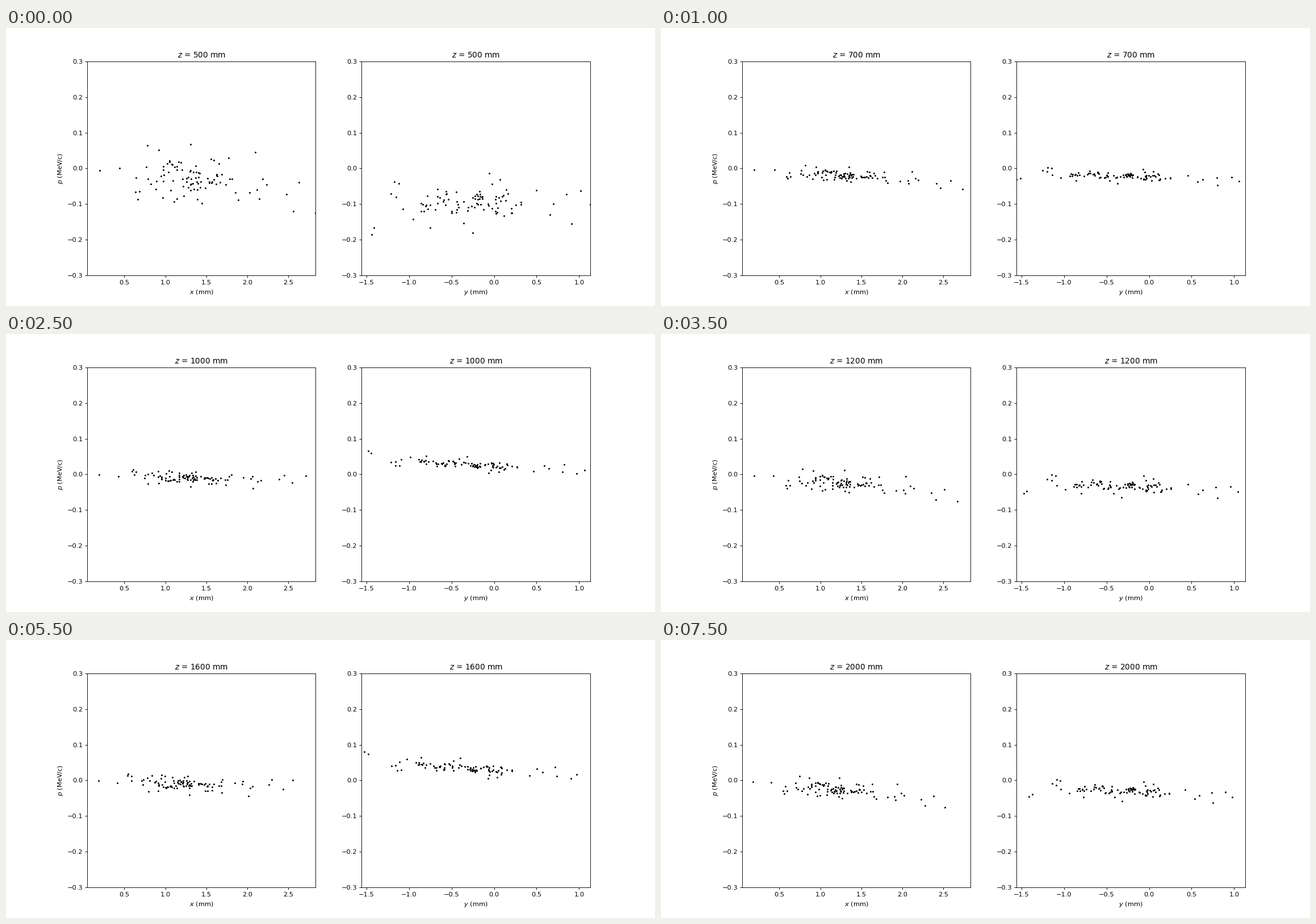
A matplotlib script that plays this animation: 1143x490 px, repeating every 8 s.

```python
import numpy as np
import matplotlib.pyplot as plt
from matplotlib.animation import FuncAnimation

W, H, DPI = 1143, 490, 81.65
STEP, PERIOD = 100, 800          # mm
MM_PER_MOMENTUM = .0051          # slope dx/dz for p = 1 MeV/c

z = np.arange(500, 2001, STEP)
swing = np.cos(2 * np.pi * (z - 1300) / PERIOD)


def fade(tau):
    return np.exp(-(z - z[0]) / tau)


def integral(f):
    """Trapezoid integral of f along z, starting at zero."""
    return np.concatenate([[0], np.cumsum((f[1:] + f[:-1]) / 2)]) * STEP


# Linear optics: p(z) = phase * p0 - focus * x0, and x follows its slope.
phase = .47 * swing + .53 * fade(260)
focus = .012 + 2e-6 * (z - 1300) - .002 * swing - .0084 * fade(100)
drift = MM_PER_MOMENTUM * integral(phase)
shrink = MM_PER_MOMENTUM * integral(focus)

# Outlying particles at the first position: (mm, MeV/c)
OUTER_X = [
    (.20, -.006), (.44, .001), (.66, -.087), (.78, .064), (.92, .052),
    (1.31, .067), (1.77, .030), (2.03, -.067), (2.10, .045), (2.12, -.059),
    (2.15, -.085), (2.19, -.029), (2.24, -.045), (2.48, -.072),
    (2.56, -.120), (2.63, -.039), (2.835, -.125)]
OUTER_Y = [
    (-1.44, -.186), (-1.41, -.166), (-1.21, -.071), (-1.17, -.037),
    (-1.15, -.080), (-1.12, -.043), (-1.07, -.114), (-.95, -.142),
    (-.75, -.166), (-.36, -.153), (-.25, -.181), (-.06, -.013), (.07, -.031),
    (.50, -.061), (.66, -.129), (.70, -.099), (.85, -.072), (.91, -.155),
    (1.02, -.063), (1.13, -.101)]

rng = np.random.default_rng(7)


def beam(outer, n, x_range, p_range):
    """Outlying particles plus a random core; ranges are (low, peak, high)."""
    core = np.column_stack([rng.triangular(*x_range, n),
                            rng.triangular(*p_range, n)])
    return np.vstack([outer, core]).T


beams = [beam(OUTER_X, 80, (.57, 1.35, 1.95), (-.105, -.03, .04)),
         beam(OUTER_Y, 76, (-1.0, -.35, .55), (-.145, -.098, -.04))]

plt.rcParams["font.family"] = "DejaVu Sans"
fig, axes = plt.subplots(1, 2, dpi=DPI, gridspec_kw={"wspace": .201},
                         figsize=((W + .01) / DPI, (H + .01) / DPI))
dots = []
for ax, name, lim in zip(axes, "xy", [(.0453, 2.836), (-1.556, 1.1287)]):
    ax.set(xlim=lim, ylim=(-.3, .3), xlabel=f"${name}$ (mm)")
    dots += ax.plot([], [], "k.", ms=3.3)
axes[0].set_ylabel("$p$ (MeV/c)")


def draw(i):
    for ax, dot, (x, p) in zip(axes, dots, beams):
        dot.set_data((1 - shrink[i]) * x + drift[i] * p,
                     phase[i] * p - focus[i] * x)
        ax.set_title(f"$z$ = {z[i]} mm")
    return dots


anim = FuncAnimation(fig, draw, frames=len(z), interval=500,
                     repeat=True, repeat_delay=0)
plt.show()
```
